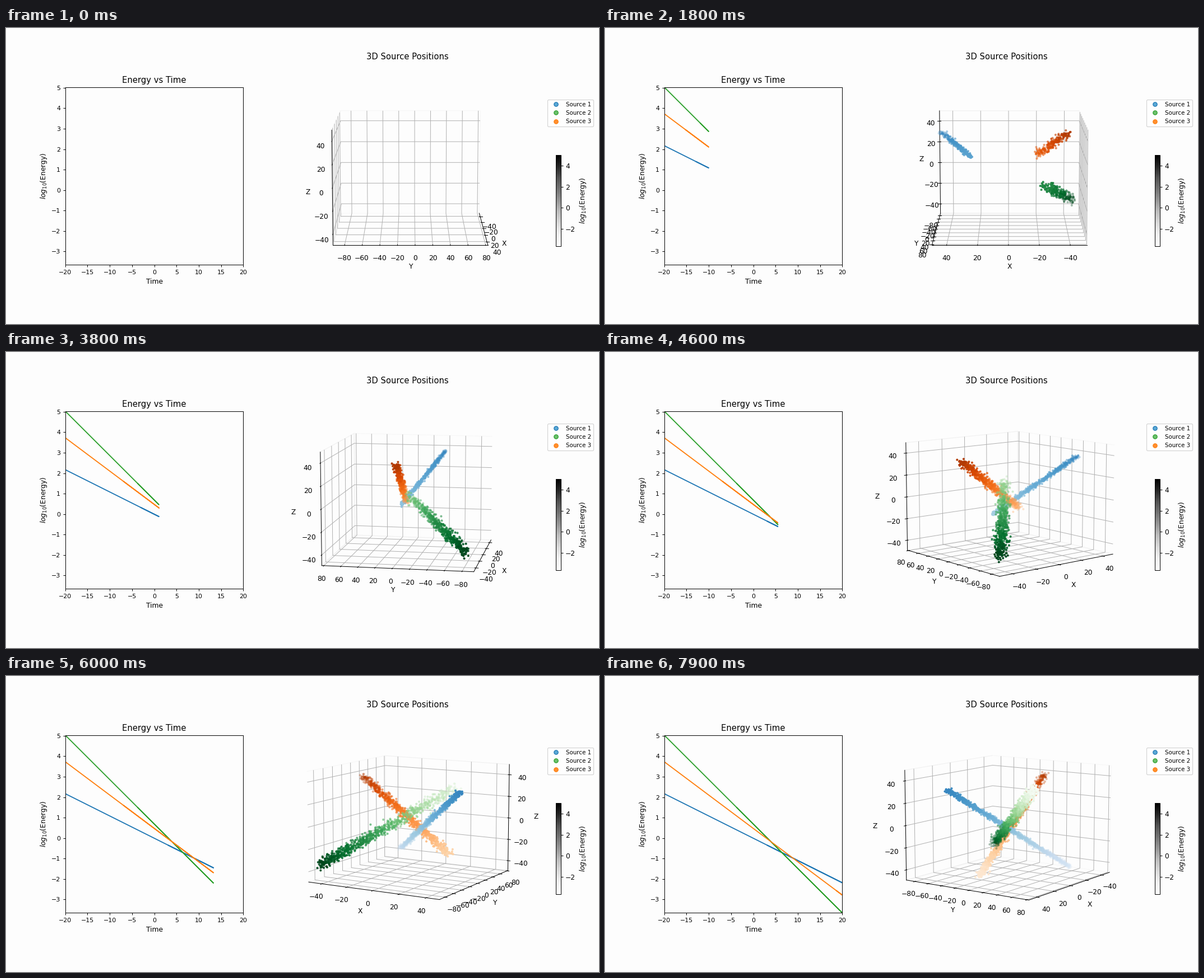
These frames come from a looping animation (1058x529 px, 8000 ms). A matplotlib script:

```python
import numpy as np
import matplotlib.pyplot as plt
from matplotlib.animation import FuncAnimation
from matplotlib.cm import ScalarMappable
from matplotlib.colors import Normalize
from matplotlib.lines import Line2D

W, H = 1058, 529
FRAMES, TURN = 80, 72
T0, T1 = -20, 20
E_MIN, E_MAX = -3.65, 5.03
N = 1000
BG = "#fdfdfd"
LABEL = r"$log_{10}$(Energy)"

rng = np.random.default_rng(4)
norm = Normalize(E_MIN, E_MAX)


class Source:
    """Particles on a straight path, losing energy with time."""

    def __init__(self, cmap, color, fill, energy, start, speed, spread):
        self.color, self.fill = color, fill
        self.t = rng.uniform(T0, T1, N)
        self.t[:2] = T0, T1
        self.e = np.interp(self.t, (T0, T1), energy)
        path = np.array(start) + np.outer(self.t, speed)
        self.pos = path + rng.normal(0, spread, (N, 3))
        self.rgba = plt.get_cmap(cmap)(norm(self.e))


sources = [
    Source("Blues", "C0", "#5aa9d6", (2.17, -2.18),
           (6.0, 4.3, -4.5), (-2.0, 1.97, -1.97), 1.0),
    Source("Greens", "C2", "#6cc06c", (5.03, -3.65),
           (-6.7, -7.1, 3.1), (1.9, 3.77, 1.88), 2.4),
    Source("Oranges", "C1", "#ff8f30", (3.73, -2.78),
           (0.1, 0.9, -0.3), (2.0, 0.1, -1.92), 1.7),
]

fig = plt.figure(figsize=(12, 6), dpi=88.16667, facecolor=BG)


def px_box(x, y, w, h):
    """Pixel box measured from the top left, as figure fractions."""
    return [x / W, 1 - (y + h) / H, w / W, h / H]


# Energy plot
ax = fig.add_axes([0.1, 0.2, 0.3, 0.6], facecolor=BG)
ax.set(xlim=(T0, T1), ylim=(E_MIN, E_MAX), title="Energy vs Time",
       xlabel="Time", ylabel=LABEL)
ax.tick_params(labelsize=9)
lines = [ax.plot([], [], color=s.color)[0] for s in sources]

# Space plot
side = 0.77 * H
ax3 = fig.add_axes(px_box(716 - side / 2, 0.12 * H, side, side),
                   projection="3d", facecolor="none")
ax3.set(xlim=(-50.7, 49.5), ylim=(-93.2, 82.5), zlim=(-49.3, 49.5),
        xlabel="X", ylabel="Y", zlabel="Z")
for axis in (ax3.xaxis, ax3.yaxis, ax3.zaxis):
    axis.pane.fill = False
fig.text(716 / W, 1 - 56.1 / H, "3D Source Positions", size=12, ha="center")

# Legend and colour bar
marks = [Line2D([], [], ls="", marker="o", mfc=s.fill, mec=s.color,
                label=f"Source {k}") for k, s in enumerate(sources, 1)]
fig.legend(handles=marks, fontsize="small", loc="upper right",
           bbox_to_anchor=(1048.3 / W, 1 - 127.8 / H), borderaxespad=0)
cax = fig.add_axes(px_box(981.4, 226.8, 8.15, 163))
fig.colorbar(ScalarMappable(norm, "Greys"), cax=cax, label=LABEL)

clouds = []


def update(i):
    now = T0 + (T1 - T0) * min(i / TURN, 1)
    while clouds:
        clouds.pop().remove()
    for s, line in zip(sources, lines):
        seen = s.t <= now if i else np.zeros(N, bool)
        line.set_data(s.t[seen], s.e[seen])
        if seen.any():
            clouds.append(ax3.scatter(*s.pos[seen].T, c=s.rgba[seen],
                                      s=11, linewidths=0))
    ax3.view_init(elev=10, azim=5 * i % 360)
    return lines + clouds


anim = FuncAnimation(fig, update, frames=FRAMES, interval=100,
                     repeat=True, repeat_delay=0)
plt.show()
```
